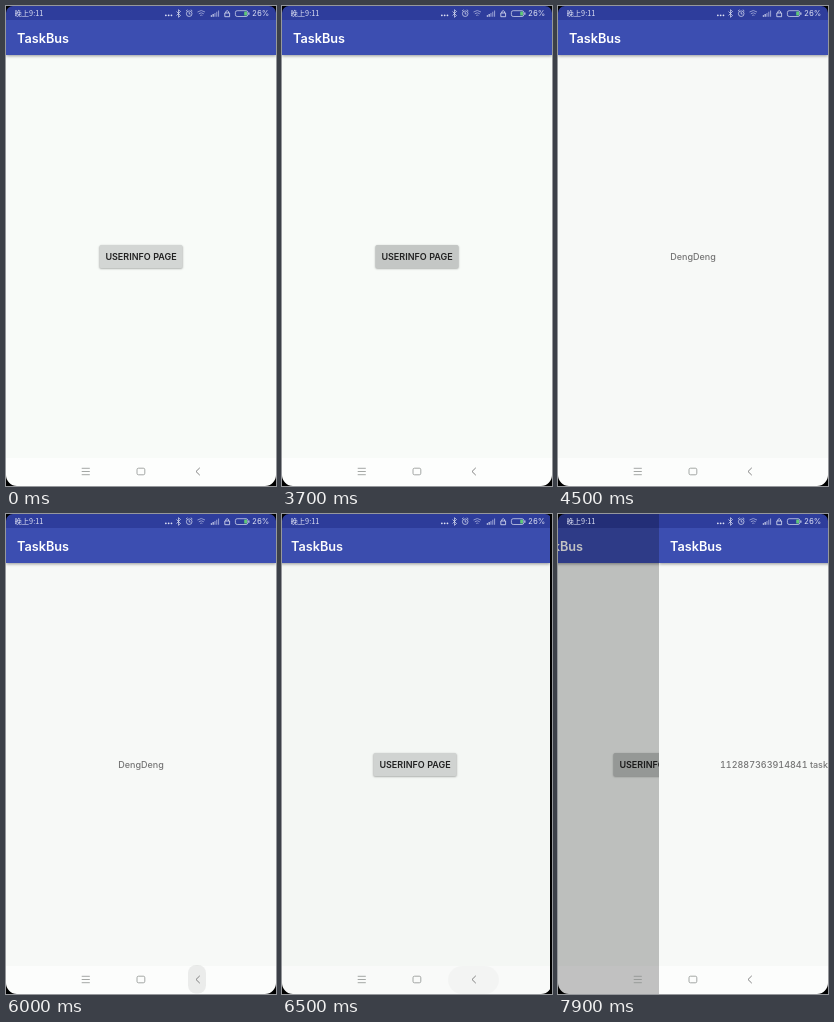
An HTML page with a canvas that plays this animation: 270x480 px, repeating every 8000 ms.

```html
<!DOCTYPE html>
<html lang="en">
<head>
<meta charset="utf-8">
<title>Page slide</title>
<style>
  html, body { margin: 0; width: 100%; height: 100%; overflow: hidden; background: #000; }
  canvas { display: block; width: 270px; height: 480px; }
</style>
</head>
<body>
<canvas id="stage"></canvas>
<script>
const W = 270, H = 480, LOOP = 8000, STEP = 100;
const canvas = document.getElementById('stage');
const ctx = canvas.getContext('2d');
const scale = window.devicePixelRatio || 1;
canvas.width = W * scale;
canvas.height = H * scale;

const SANS = 'Inter, Roboto, sans-serif';
const CJK = '"Noto Sans CJK SC", "Noto Sans CJK", sans-serif';

// Share of the way still to go, from 1 down to 0, slowing towards the end.
function remaining(t, start, duration, power) {
  const p = Math.min(1, Math.max(0, (t - start) / duration));
  return (1 - p) ** power;
}

function rect(x, y, w, h, color, radius = 0) {
  ctx.fillStyle = color;
  ctx.beginPath();
  ctx.roundRect(x, y, w, h, radius);
  ctx.fill();
}

function text(str, x, y, font, color, align = 'left') {
  ctx.font = font;
  ctx.fillStyle = color;
  ctx.textAlign = align;
  ctx.fillText(str, x, y);
}

function stroke(path, color, width = 0.8) {
  ctx.strokeStyle = color;
  ctx.lineWidth = width;
  ctx.stroke(new Path2D(path));
}

function withShadow(color, blur, offset, draw) {
  ctx.save();
  ctx.shadowColor = color;
  ctx.shadowBlur = blur * scale;
  ctx.shadowOffsetY = offset * scale;
  draw();
  ctx.restore();
}

function page(x, background, content) {
  ctx.save();
  ctx.translate(x, 0);
  ctx.beginPath();
  ctx.rect(0, 0, W, H);
  ctx.clip();
  rect(0, 0, W, H, background);
  withShadow('rgba(0,0,0,.4)', 3, 1, () => rect(0, 14, W, 35, '#3c4eb1'));
  rect(0, 0, W, 14, '#2e3d9c');
  text('TaskBus', 11, 37, '600 12.7px ' + SANS, '#fff');
  content();
  rect(0, 452, W, 28, 'rgba(255,255,255,.7)');
  ctx.restore();
}

function homePage(x, dim, pressed) {
  page(x, '#f8fbf8', () => {
    withShadow('rgba(0,0,0,.35)', 2, 0.8, () =>
      rect(93.5, 239, 83, 23, pressed ? '#c4c7c5' : '#d3d6d4', 1.5));
    text('USERINFO PAGE', 135, 253.6, '600 9px ' + SANS, '#222', 'center');
  });
  rect(x, 0, W, H, `rgba(0,0,0,${dim})`);
}

function userPage(x, label, left) {
  page(x, '#f7f9f7', () => {
    const font = '500 9px ' + SANS;
    if (left) text(label, left, 253.6, font, '#757575');
    else text(label, 135, 253.6, font, '#757575', 'center');
  });
}

function statusBar() {
  const ink = '#dfe2f4', faint = '#8f98cf';
  text('晚上9:11', 8.5, 10.2, '7.3px ' + CJK, ink);
  for (let i = 0; i < 3; i++) rect(159 + i * 2.8, 8.5, 1.7, 1.7, ink, 0.8);
  stroke('M170.5 5.5L174.5 9.5L172.5 11.3V3.7L174.5 5.5L170.5 9.5', ink, 0.7);
  stroke('M186 7.7A2.8 2.8 0 1 1 180.4 7.7A2.8 2.8 0 1 1 186 7.7M183.2 6V8H184.6M180 5L181.6 3.8M186.4 5L184.8 3.8', ink, 0.7);
  stroke('M191.5 6Q195.3 3 199 6M192.8 7.8Q195.3 5.8 197.8 7.8M194.2 9.5Q195.3 8.6 196.4 9.5', faint, 1);
  for (let i = 0; i < 5; i++) rect(204.8 + i * 1.8, 9.3 - i * 1.2, 1.1, 1.5 + i * 1.2, i < 2 ? ink : faint);
  stroke('M218.8 7H223.6V10.7H218.8ZM219.8 7V5.6Q221.2 3.6 222.6 5.6V7', ink, 0.8);
  ctx.strokeStyle = ink;
  ctx.lineWidth = 0.7;
  ctx.beginPath();
  ctx.roundRect(229.4, 4.7, 12.4, 5.8, 1.8);
  ctx.stroke();
  rect(242.4, 6.4, 1, 2.4, ink);
  rect(238.2, 5.6, 2.8, 4, '#5fc878', 0.5);
  text('26%', 246, 10.3, '7.6px ' + SANS, ink);
}

function navBar() {
  const ink = '#8f9290';
  stroke('M75.7 462.3H83.8M75.7 465.5H83.8M75.7 468.7H83.8', ink);
  ctx.beginPath();
  ctx.roundRect(131, 462.2, 7.8, 6.6, 1.5);
  ctx.stroke();
  stroke('M193.8 461.8L190 465.5L193.8 469.2', '#777', 0.9);
}

function backRipple(t) {
  if (t < 6000 || t >= 6900) return;
  if (t < 6300) return rect(182, 451, 18, 28.5, 'rgba(0,0,0,.065)', 8);
  const width = t < 6400 ? 38 : 51;
  rect(191.5 - width / 2, 452, width, 28, `rgba(0,0,0,${0.03 * (6900 - t) / 500})`, 14);
}

function corners() {
  ctx.fillStyle = '#000';
  ctx.beginPath();
  ctx.rect(0, 0, W, H);
  ctx.roundRect(0, 0, W, H, [7, 7, 11, 11]);
  ctx.fill('evenodd');
}

function draw(t) {
  let x = W, cover = 0;
  if (t >= 7800) {
    x = W * remaining(t, 7847, 244, 4);
    cover = 1 - x / W;
  } else if (t >= 6300) {
    x = W * (1 - remaining(t, 6352, 190, 5));
    cover = remaining(t, 6320, 300, 3.5);
  } else if (t >= 3800) {
    x = W * remaining(t, 3800, 244, 4);
    cover = 1 - x / W;
  }
  const pressed = (t >= 3600 && t < 4000) || t >= 7800;

  ctx.setTransform(scale, 0, 0, scale, 0, 0);
  rect(0, 0, W, H, '#000');
  homePage(Math.round(-61 * cover), 0.38 * cover, pressed);
  x = Math.round(x);
  if (x < W) {
    if (t >= 7800) userPage(x, '112887363914841 task complete', 61);
    else userPage(x, 'DengDeng');
  }
  backRipple(t);
  statusBar();
  navBar();
  corners();
}

// The screen refreshes ten times a second and rests while Back is held.
const begin = performance.now();
function tick() {
  let t = Math.floor((performance.now() - begin) % LOOP / STEP) * STEP;
  if (t > 6000 && t < 6300) t = 6000;
  draw(t);
  requestAnimationFrame(tick);
}
canvas.style.fontVariantNumeric = 'tabular-nums';
tick();
</script>
</body>
</html>
```
